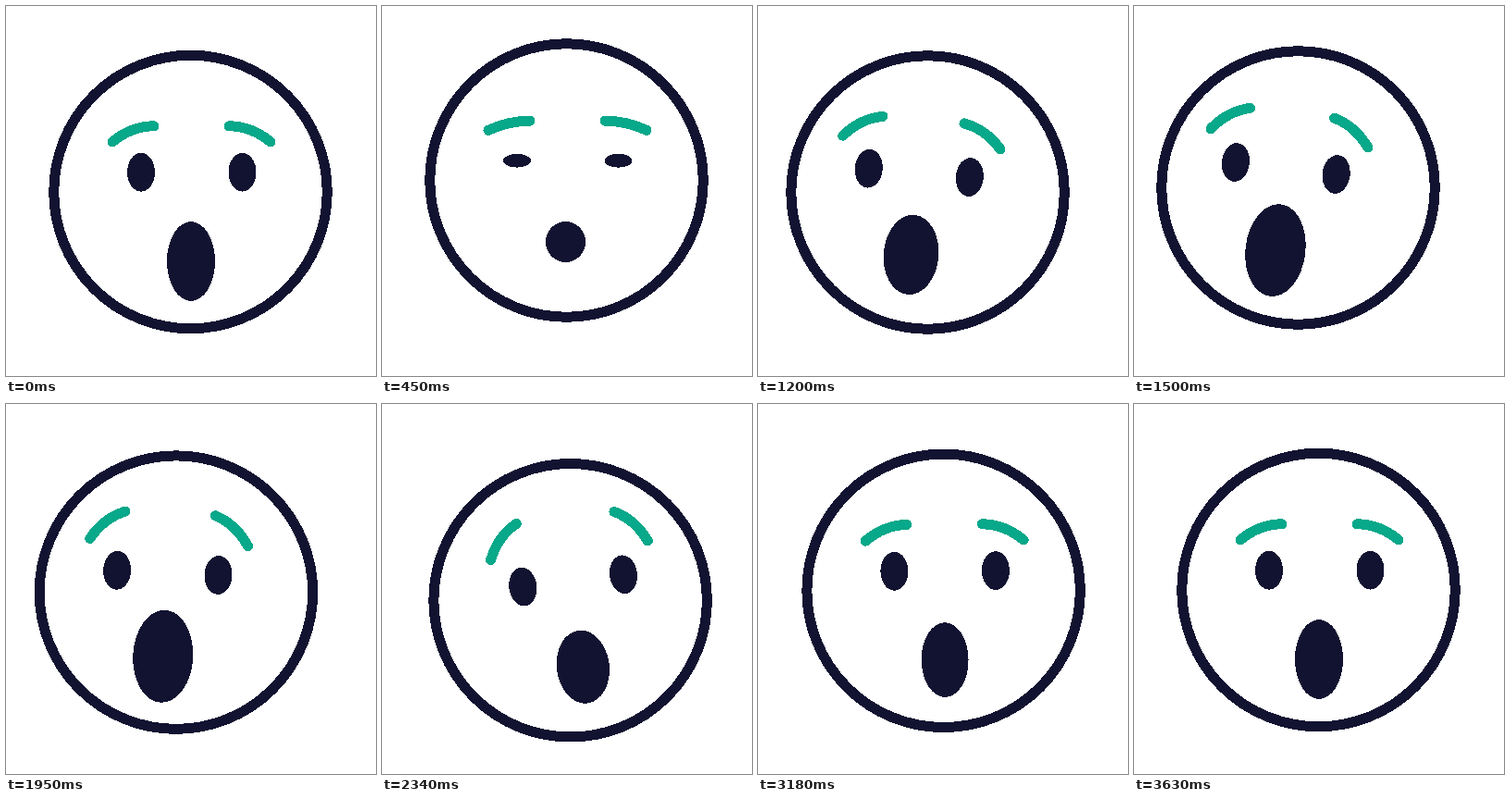
An HTML page that plays this animation: 400 by 400 pixels, repeating every 3660 ms.

```html
<!DOCTYPE html>
<html lang="en">
<head>
<meta charset="utf-8">
<title>Surprised face</title>
<style>
  html, body { margin: 0; width: 100%; height: 100%; overflow: hidden; background: #fff; }
  svg { display: block; width: 100vw; height: 100vh; shape-rendering: crispEdges; }
  .line { fill: none; stroke-width: 11; stroke-linecap: round; }
</style>
</head>
<body>
<svg viewBox="0 0 400 400">
  <g id="head">
    <circle class="line" r="147.75" stroke="#121331"/>
    <g id="face">
      <g fill="#121331">
        <ellipse id="eyeL" cx="-53.5" cy="-21.3" rx="15"/>
        <ellipse id="eyeR" cx="56" cy="-21.3" rx="15"/>
        <ellipse id="mouth"/>
      </g>
      <g class="line" stroke="#08a88a">
        <path id="browL"/>
        <path id="browR"/>
      </g>
    </g>
  </g>
</svg>
<script>
const LOOP = 3660;

const el = {};
document.querySelectorAll('[id]').forEach(n => el[n.id] = n);
const set = (node, attrs) => {
  for (const k in attrs) node.setAttribute(k, attrs[k]);
};

// A brow hinges on its outer end; side is 1 for left, -1 for right
function brow(node, x, side, flat, turn) {
  set(node, {
    d: `M0 0Q${21 * side} ${-17 * flat} ${45 * side} ${-17 * flat}`,
    transform: `translate(${x} -54.2) rotate(${-turn * side})`
  });
}

function draw(t) {
  // Progress from 0 to 1 between two times, eased at both ends
  const ease = (from, to) => {
    const u = Math.min(1, Math.max(0, (t - from) / (to - from)));
    return u * u * (3 - 2 * u);
  };

  // Look left, look right, return to the middle
  const left = ease(690, 1470);
  const right = ease(1660, 2870);
  const home = ease(2870, 3230);
  const swing = ease(1680, 2580);

  const x = 199.5 - 22 * left + 44 * right - 22 * home;
  const slide = -17 * left + 25.9 * swing - 8.9 * home;
  const tilt = 6.8 * left - 14.7 * ease(1680, 2460) + 7.9 * home;

  // Dip, jump up, then bob with each turn and settle
  const y = 201 + 19.5 * ease(0, 210) - 32 * ease(210, 455)
    + 13 * ease(455, 1210) - 5 * ease(1210, 1490)
    + 16 * ease(1650, 2300) - 19 * ease(2300, 2900)
    + 9 * ease(2900, 3240) - 5 * ease(3240, 3450) + 3.5 * ease(3450, 3630);

  const blink = ease(200, 450) - ease(450, 680);
  const eye = { ry: 20.9 - 13.5 * blink };
  const flat = 1 - 0.41 * blink;
  const turn = 13.7 * left + 13.8 * ease(1680, 2280) - 27.5 * ease(2280, 3270);

  // Mouth: purse, gape, purse, rest
  const purse = ease(0, 450), gape = ease(570, 1500);
  const shrink = ease(1950, 2880), rest = ease(2880, 3270);

  set(el.head, { transform: `translate(${x} ${y})` });
  set(el.face, { transform: `translate(${slide} 0) rotate(${tilt})` });
  set(el.eyeL, eye);
  set(el.eyeR, eye);
  set(el.mouth, {
    cx: 0.5 - 1.5 * purse + 1.5 * gape,
    cy: 75 - 8.5 * purse + 1.5 * gape + 5.5 * swing + 1.5 * rest,
    rx: 26 - 4.5 * purse + 11 * gape - 10.5 * shrink + 4 * rest,
    ry: 43 - 21 * purse + 28 * gape - 27 * shrink + 20 * rest
  });
  brow(el.browL, -84.5, 1, flat, turn);
  brow(el.browR, 86.5, -1, flat, turn);
}

const start = performance.now();
function tick() {
  draw((performance.now() - start) % LOOP);
  requestAnimationFrame(tick);
}
tick();
</script>
</body>
</html>
```
